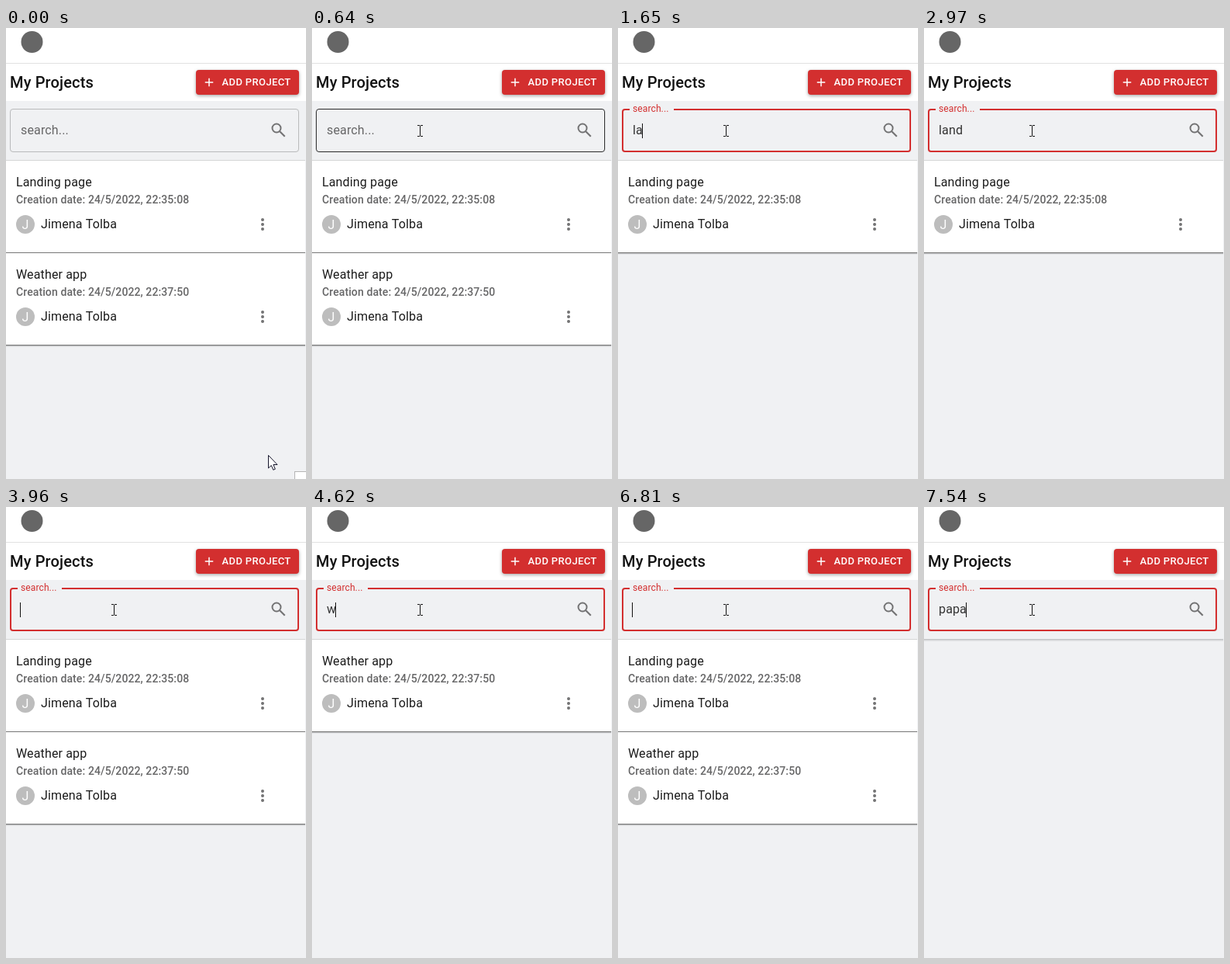
An HTML page with a canvas that plays this animation: 387x581 px, repeating every 8000 ms.

```html
<!DOCTYPE html>
<html lang="en">
<head>
<meta charset="utf-8">
<title>My Projects</title>
<style>
  html, body { margin: 0; width: 387px; height: 581px; overflow: hidden; background: #f0f1f3; }
  canvas { display: block; }
</style>
</head>
<body>
<canvas id="stage" width="387" height="581"></canvas>
<script>
const ctx = document.getElementById('stage').getContext('2d');
const LOOP = 8000;
const BG = '#f0f1f3', RED = '#d32f2f', INK = '#1c1c1c', MUTED = '#666667', ICON = '#737374';
const FOCUS = 660;
const OWNER = 'Jimena Tolba';
const PROJECTS = [
  { title: 'Landing page', date: '24/5/2022, 22:35:08' },
  { title: 'Weather app', date: '24/5/2022, 22:37:50' }
];

// start time, text in the search field, caret visible
const TYPING = [
  [0, '', false], [FOCUS, '', true], [1190, '', false],
  [1650, 'la', true], [2180, 'lan', true], [2440, 'land', true], [2970, 'land', false],
  [3370, 'lan', true], [3570, 'la', true], [3760, 'l', true], [3960, '', true],
  [4560, 'w', true], [5150, 'w', false], [5620, 'we', true], [5750, 'wea', true],
  [6280, 'wea', false], [6380, 'we', true], [6480, 'w', true], [6810, '', true],
  [7140, 'p', true], [7340, 'pa', true], [7480, 'pap', true], [7540, 'papa', true]
];

// start time, pointer x, pointer y
const POINTER = [
  [0, 338, 550], [70, 312, 486], [150, 245, 340], [230, 182, 210], [310, 150, 141],
  [450, 143, 135], [528, 140, 133], [606, 139, 132]
];

const at = (keys, t) => keys.filter(k => k[0] <= t).pop();
const clamp = v => Math.min(1, Math.max(0, v));
const easeOut = v => 1 - Math.pow(1 - clamp(v), 3);
const mix = (a, b, p) => a + (b - a) * p;

function rect(x, y, w, h, color) {
  ctx.fillStyle = color;
  ctx.fillRect(x, y, w, h);
}

function disc(x, y, r, color) {
  ctx.fillStyle = color;
  ctx.beginPath();
  ctx.arc(x, y, r, 0, Math.PI * 2);
  ctx.fill();
}

function line(points, color, width) {
  ctx.strokeStyle = color;
  ctx.lineWidth = width;
  ctx.beginPath();
  points.forEach(([x, y]) => ctx.lineTo(x, y));
  ctx.stroke();
}

function text(str, x, y, size, color, weight = 400, spacing = 0.15) {
  ctx.font = `${weight} ${size}px Roboto, sans-serif`;
  ctx.letterSpacing = spacing + 'px';
  ctx.fillStyle = color;
  ctx.fillText(str, x, y);
  return ctx.measureText(str).width;
}

function drawHeader() {
  rect(0, 0, 387, 94, '#fff');
  rect(0, 45, 387, 1, '#e1e1e1');
  disc(33.5, 18, 14, '#666');
  text('My Projects', 5, 77, 20, '#111', 500);

  ctx.save();
  ctx.shadowColor = 'rgba(0,0,0,.35)';
  ctx.shadowBlur = 4;
  ctx.shadowOffsetY = 1.5;
  ctx.fillStyle = RED;
  ctx.beginPath();
  ctx.roundRect(245, 54, 133, 32, 4);
  ctx.fill();
  ctx.restore();
  line([[256.75, 70], [267.25, 70]], '#fff', 1.5);
  line([[262, 64.75], [262, 75.25]], '#fff', 1.5);
  text('ADD PROJECT', 278.5, 74, 13, '#fff', 500, 0.37);
}

function drawSearch(t, value, caret, hover) {
  const focused = t >= FOCUS;
  const width = focused ? 2 : 1;
  ctx.strokeStyle = focused ? RED : hover ? '#2b2b2b' : '#b9babb';
  ctx.lineWidth = width;
  ctx.beginPath();
  ctx.roundRect(5 + width / 2, 104 + width / 2, 373 - width, 56 - width, 4 - width / 2);
  ctx.stroke();

  const gap = 57 * easeOut((t - FOCUS - 50) / 100);
  if (focused) rect(15, 103, gap, 4, BG);

  const p = easeOut((t - FOCUS) / 200);
  const scale = mix(1, 0.75, p);
  const [r, g, b] = [[102, 211], [102, 47], [103, 47]].map(([from, to]) => Math.round(mix(from, to, p)));
  ctx.save();
  ctx.translate(19, mix(120, 95, p));
  ctx.scale(scale, scale);
  text('search...', 0, 17, 16, `rgb(${r},${g},${b})`);
  ctx.restore();

  const typed = text(value, 19, 137, 16, '#333');
  if (caret) rect(Math.floor(19 + typed - 0.3), 123, 1, 19, '#111');

  ctx.strokeStyle = ICON;
  ctx.lineWidth = 2;
  ctx.beginPath();
  ctx.arc(349, 129, 5.5, 0, Math.PI * 2);
  ctx.stroke();
  line([[353.2, 133.2], [359.7, 139.7]], ICON, 2.1);
}

function drawCard({ title, date }, top) {
  rect(0, top, 386, 118, '#fff');
  rect(0, top + 118, 386, 1, '#777');
  text(title, 13, top + 33, 16, INK);
  text('Creation date: ' + date, 13, top + 55, 14, MUTED, 500, 0.1);
  disc(25, top + 82, 12, '#bdbdbd');
  ctx.textAlign = 'center';
  text('J', 25, top + 87.5, 16, '#fff', 400, 0);
  ctx.textAlign = 'left';
  text(OWNER, 45, top + 87, 16, INK);
  [-6, 0, 6].forEach(dy => disc(331, top + 82 + dy, 2, ICON));
}

function drawList(query) {
  const found = PROJECTS.filter(p => p.title.toLowerCase().includes(query));
  rect(0, 170, 386, 1, found.length ? '#d4d5d6' : '#c2c3c5');
  found.forEach((project, i) => drawCard(project, 171 + i * 119));
  const end = 171 + found.length * 119;
  rect(0, end, 386, 1, found.length ? '#bfc0c2' : '#d6d7d9');
  rect(0, end + 1, 386, 1, '#e2e3e5');
}

function drawArrow(x, y) {
  ctx.beginPath();
  [[0, 0], [0, 16.5], [3.8, 13], [6.3, 18.8], [8.8, 17.7], [6.4, 12], [11.5, 12]]
    .forEach(([dx, dy]) => ctx.lineTo(x + 0.5 + dx, y + 0.5 + dy));
  ctx.closePath();
  ctx.fillStyle = '#fff';
  ctx.fill();
  ctx.strokeStyle = '#15152b';
  ctx.lineWidth = 1;
  ctx.stroke();
}

function drawBeam(x, y) {
  rect(x, y - 6, 1, 13, '#111');
  [y - 7, y + 7].forEach(edge => {
    rect(x - 3, edge, 3, 1, '#111');
    rect(x + 1, edge, 3, 1, '#111');
  });
}

function draw(t) {
  const [, value, caret] = at(TYPING, t);
  const [, x, y] = at(POINTER, t);
  const hover = y < 160;
  rect(0, 0, 387, 581, BG);
  drawHeader();
  drawSearch(t, value, caret, hover);
  drawList(value);
  if (t < 70) {
    rect(372, 571, 15, 10, '#b5b5b5');
    rect(373, 572, 14, 9, '#fff');
  }
  (hover ? drawBeam : drawArrow)(x, y);
}

const start = performance.now();
function tick() {
  draw((performance.now() - start) % LOOP);
  requestAnimationFrame(tick);
}
tick();
</script>
</body>
</html>
```
